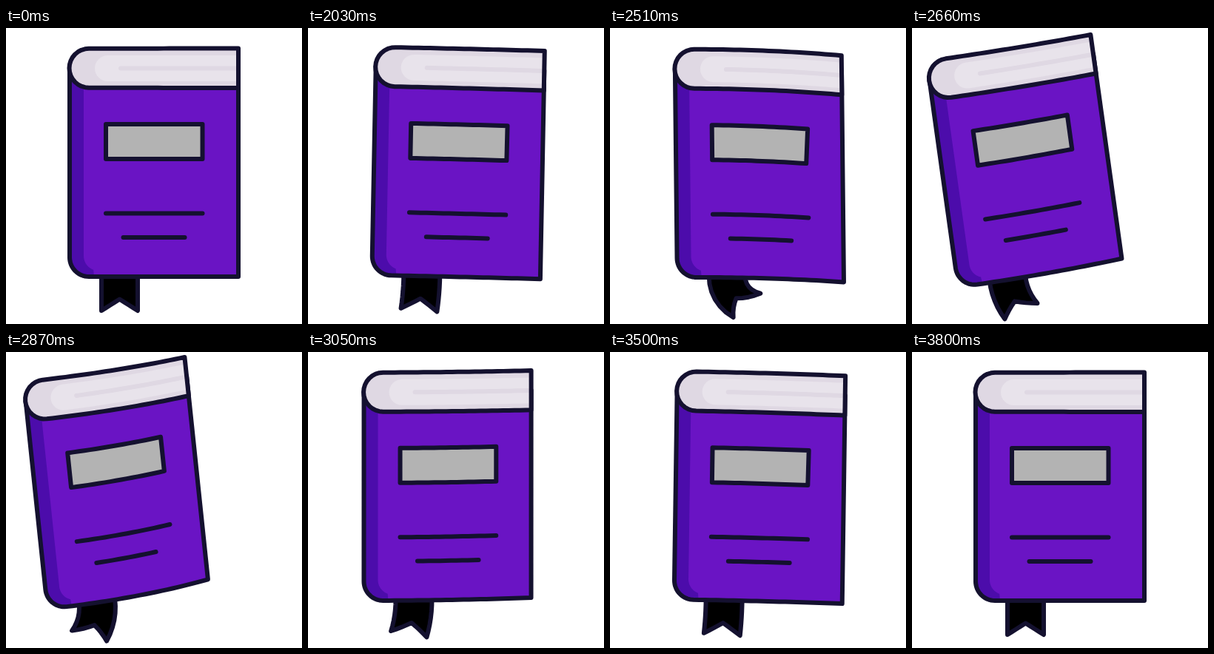
An HTML page with a canvas for the animation above (3830 ms loop, 400 by 400 pixels).

```html
<!DOCTYPE html>
<html lang="en">
<head>
<meta charset="utf-8">
<title>Swinging book</title>
<style>
  html, body { margin: 0; width: 100%; height: 100%; overflow: hidden; background: #fff; }
  canvas { display: block; width: 400px; height: 400px; }
</style>
</head>
<body>
<canvas id="stage" width="400" height="400"></canvas>
<script>
const ctx = document.getElementById('stage').getContext('2d');
const LOOP = 3830, START = 2000, STEP = 30;
const INK = '#14112f', COVER = '#6a14c4', SPINE = '#4c0cab';
const PAPER = '#dfd8e3', SHEEN = '#e8e3eb', PLATE = '#b3b3b3';
const LEFT = 86, RIGHT = 314, TOP = 27.5, FOLD = 81, BOTTOM = 336;
const CX = 200, CY = 182;

// Keys are [time, value] pairs, eased in and out between neighbours.
const tracks = {
  shift: [[1980, 0], [2240, 43.5], [2310, 43.5], [2750, -54], [3250, 10], [3650, 0]],
  angle: [[1980, 0], [2240, 14.8], [2695, -8.2], [3250, 2.9], [3650, 0]],
  bend: [[1980, 0], [2250, 16.5], [2350, 16.5], [2830, -14], [3280, 8.5], [3650, 0]],
  ribbon: [[1980, 0], [2080, -0.15], [2490, 0.72], [2890, -0.4], [3280, 0.28], [3520, -0.06], [3650, 0]]
};

const ease = p => p < 0.5 ? 2 * p * p : 1 - 2 * (1 - p) * (1 - p);

function valueAt(keys, t) {
  if (t <= keys[0][0]) return keys[0][1];
  for (let i = 1; i < keys.length; i++) {
    const [t0, v0] = keys[i - 1], [t1, v1] = keys[i];
    if (t < t1) return v0 + (v1 - v0) * ease((t - t0) / (t1 - t0));
  }
  return keys[keys.length - 1][1];
}

function poseAt(t) {
  const pose = {};
  for (const name in tracks) pose[name] = t < START + STEP ? 0 : valueAt(tracks[name], t);
  const rad = pose.angle * Math.PI / 180;
  pose.cos = Math.cos(rad);
  pose.sin = Math.sin(rad);
  pose.lift = 0.05 * Math.max(0, pose.angle) ** 2;
  return pose;
}

let pose;

// Turns a point of the book about its centre and moves it to the stage.
function place(x, y) {
  const dx = x - CX, dy = y - CY;
  return [
    CX + pose.shift + dx * pose.cos - dy * pose.sin,
    CY + pose.lift + dx * pose.sin + dy * pose.cos
  ];
}

// Bends the cover towards its free edge.
function curl(x, y, gain = 1) {
  const u = Math.max(0, (x - LEFT) / (RIGHT - LEFT));
  const force = Math.abs(pose.bend) * (pose.bend < 0 ? 2 : 1);
  const pinch = 0.12 * force * (CY - y) / 154;
  return place(x - 0.3 * force * u ** 4, y + (pose.bend * gain + pinch) * u * u);
}

const curlPrint = (x, y) => curl(x, y, 1.15);

function curlPlate(x, y) {
  const slant = 0.25 * Math.max(0, pose.bend) * (x - 135) / 130 * (y - 130) / 47;
  return curlPrint(x - slant, y);
}

function curlRibbon(x, y) {
  const s = Math.max(0, (y - BOTTOM) / 46), turn = pose.ribbon * s;
  const across = x - 153.5, along = y - BOTTOM, lean = 0.85 * turn;
  return place(
    153.5 + along * Math.sin(lean) + across * Math.cos(turn),
    BOTTOM + 0.09 * pose.bend + along * Math.cos(lean) - across * Math.sin(turn)
  );
}

function arc(cx, cy, r, from, to) {
  const pts = [];
  for (let i = 0; i <= 16; i++) {
    const a = (from + (to - from) * i / 16) * Math.PI / 180;
    pts.push([cx + r * Math.cos(a), cy + r * Math.sin(a)]);
  }
  return pts;
}

function draw(pts, { fill, stroke, width = 6, closed = true, warp = curl }) {
  const all = closed ? [...pts, pts[0]] : pts;
  ctx.beginPath();
  ctx.moveTo(...warp(...all[0]));
  for (let i = 1; i < all.length; i++) {
    const [x0, y0] = all[i - 1], [x1, y1] = all[i];
    const n = Math.max(1, Math.ceil(Math.hypot(x1 - x0, y1 - y0) / 8));
    for (let k = 1; k <= n; k++) {
      ctx.lineTo(...warp(x0 + (x1 - x0) * k / n, y0 + (y1 - y0) * k / n));
    }
  }
  if (closed) ctx.closePath();
  if (fill) { ctx.fillStyle = fill; ctx.fill(); }
  if (stroke) { ctx.strokeStyle = stroke; ctx.lineWidth = width; ctx.stroke(); }
}

const line = (x0, x1, y, stroke, warp = curlPrint) =>
  draw([[x0, y], [x1, y]], { stroke, warp, closed: false });

const foot = arc(112, 310, 26, 90, 180);
const cover = [[LEFT, 54], [RIGHT, 54], [RIGHT, BOTTOM], ...foot];
const spine = [[LEFT, 54], [105, 54], ...arc(125, 308, 20, 180, 110), [119, BOTTOM], ...foot];
const pages = [[RIGHT, TOP], [RIGHT, FOLD], ...arc(112, 54.25, 26.5, 90, 270)];
const sheen = [[RIGHT, 37], [RIGHT, 72], ...arc(137.5, 54.5, 17.5, 90, 270)];
const plate = [[135, 130], [265.5, 130], [265.5, 177], [135, 177]];
const ribbon = [[129, 326], [129, 382], [153.5, 366.5], [178, 382], [178, 326]];

function render(now) {
  const t = now % LOOP;
  pose = poseAt(START + Math.floor((t - START) / STEP) * STEP);
  ctx.fillStyle = '#fff';
  ctx.fillRect(0, 0, 400, 400);

  draw(ribbon, { fill: '#000', stroke: INK, warp: curlRibbon });

  draw(cover, { fill: COVER });
  draw(spine, { fill: SPINE });
  draw(cover, { stroke: INK });

  draw(pages, { fill: PAPER });
  draw(sheen, { fill: SHEEN });
  line(155, 312, 54.5, PAPER, curl);
  draw(pages, { stroke: INK });

  draw(plate, { fill: PLATE, stroke: INK, warp: curlPlate });
  line(135, 265.5, 250.5, INK);
  line(158.5, 241.5, 283, INK);
}

function tick() {
  render(performance.now());
  requestAnimationFrame(tick);
}

ctx.lineJoin = ctx.lineCap = 'round';
tick();
</script>
</body>
</html>
```
